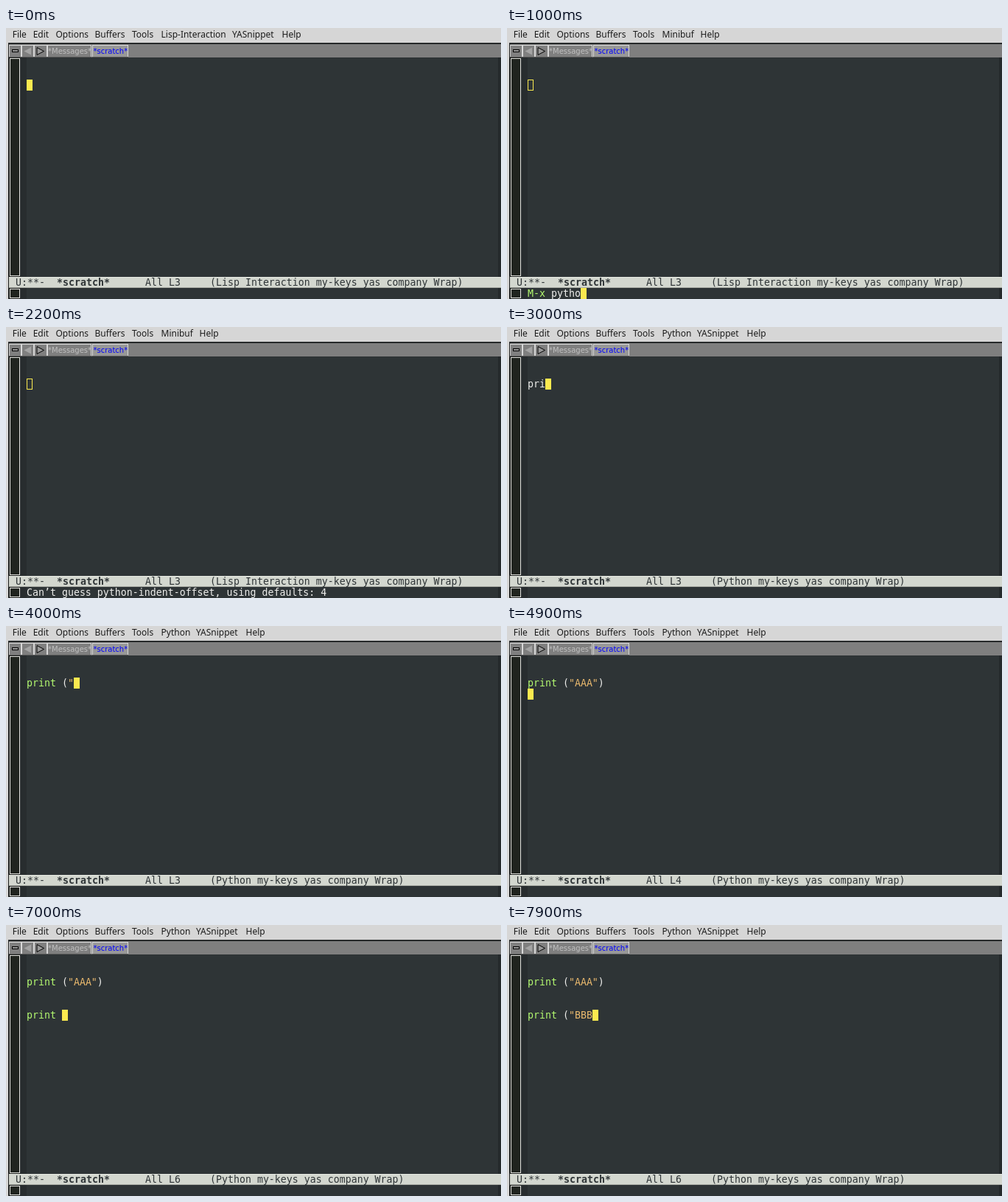
These frames come from a looping animation (672x368 px, 8000 ms). An HTML page:

```html
<!DOCTYPE html>
<html lang="en">
<head>
<meta charset="utf-8">
<title>Scratch buffer</title>
<style>
  html, body { margin: 0; width: 100%; height: 100%; overflow: hidden; background: #2e3436; }
  svg { display: block; width: 672px; height: 368px; }
  text { white-space: pre; }
  .menu { font: 12px "Noto Sans", "Open Sans", sans-serif; fill: #1c1c1c; }
  .tab { font: 10px "DejaVu Sans", sans-serif; fill: #c0c0c0; }
  .mono { font: 13.289px "DejaVu Sans Mono", monospace; fill: #eeeeec; }
  .mode { fill: #2e3436; }
  .bold { font-weight: bold; }
  .key { fill: #b4fa70; }
  .str { fill: #e9b96e; }
  .crisp { shape-rendering: crispEdges; }
</style>
</head>
<body>
<svg viewBox="0 0 672 368">
  <g class="crisp">
    <rect width="672" height="368" fill="#2e3436"/>
    <!-- fringes -->
    <rect x="19" y="40" width="9" height="298" fill="#282d2f"/>
    <rect x="668" y="40" width="4" height="298" fill="#24292b"/>
    <rect x="19" y="353" width="9" height="15" fill="#282d2f"/>
    <rect x="668" y="353" width="4" height="15" fill="#24292b"/>
    <!-- menu bar and window edge -->
    <rect width="672" height="20" fill="#d6d6d6"/>
    <rect y="20" width="672" height="2" fill="#26292a"/>
    <rect y="20" width="3" height="348" fill="#d6d6d6"/>
    <rect x="3" y="22" width="1" height="346" fill="#1a1c1c"/>
    <!-- tab bar -->
    <rect x="4" y="22" width="668" height="18" fill="#7f7f7f"/>
    <rect x="118" y="24" width="47" height="15" fill="#989898"/>
    <g id="boxes" fill="none"></g>
    <rect x="8.5" y="29.5" width="8" height="3" fill="#999" stroke="#000"/>
    <!-- scroll bars -->
    <rect x="4" y="40" width="15" height="298" fill="#191c1a"/>
    <rect x="5.5" y="41.5" width="13" height="295" fill="#20241f" stroke="#e4e4e0"/>
    <rect x="4" y="353" width="15" height="15" fill="#191c1a"/>
    <rect x="5.5" y="354.5" width="13" height="12" fill="#20241f" stroke="#e4e4e0"/>
    <!-- mode line -->
    <rect x="4" y="338" width="668" height="15" fill="#d3d7cf"/>
    <rect x="4" y="338" width="668" height="1" fill="#e6e9e2"/>
    <rect x="4" y="352" width="668" height="1" fill="#a9aca5"/>
  </g>
  <path d="M34 26.5V36.5L24.5 31.5Z" fill="#a4a4a4"/>
  <path d="M42 26.5V36.5L51.5 31.5Z" fill="#999" stroke="#000"/>
  <text class="tab" x="57" y="35">*Messages*</text>
  <text class="tab" x="118.5" y="35" style="fill:#00f">*scratch*</text>
  <g id="menu" class="menu"></g>
  <text class="mono mode" x="13" y="350">U:**-</text>
  <text class="mono mode bold" x="69" y="350">*scratch*</text>
  <text class="mono mode" x="189" y="350" id="line"></text>
  <text class="mono mode" x="277" y="350" id="modes"></text>
  <text class="mono" x="28" y="82" id="row1"></text>
  <text class="mono" x="28" y="127" id="row2"></text>
  <text class="mono" x="28" y="365" id="echo"></text>
  <rect id="hollow" class="crisp" x="28.5" y="70.5" width="7" height="14" fill="none" stroke="#fce94f"/>
  <rect id="cursor" class="crisp" width="8" height="15" fill="#fce94f"/>
</svg>
<script>
const LOOP = 8000, CELL = 8, LEFT = 28;
const el = id => document.getElementById(id);
const span = (cls, s) => `<tspan class="${cls}">${s}</tspan>`;

// raised boxes around the tab bar buttons: left, right
el("boxes").innerHTML = [[5, 20], [22, 37], [39, 55], [57, 115], [118, 165]].map(([a, b]) =>
  `<path stroke="#d8d8d8" d="M${a - .5} 39V23.5H${b + .5}V39"/>` +
  `<path stroke="#5c5c5c" d="M${a - 1} 39.5H${b + 1}"/>`).join("");

const FIXED = [[8.7, "File"], [36.7, "Edit"], [67.5, "Options"], [120.5, "Buffers"], [171, "Tools"]];
const MENUS = {
  lisp: [[210.5, "Lisp-Interaction"], [307, "YASnippet"], [374.5, "Help"]],
  mini: [[210.5, "Minibuf"], [262.5, "Help"]],
  python: [[210.5, "Python"], [258, "YASnippet"], [325.5, "Help"]]
};

// part of s typed by time t
const typed = (s, t, start, step) =>
  t < start ? "" : s.slice(0, Math.floor((t - start) / step) + 1);

const highlight = s => s
  .replace(/"[^"]*"?/, m => `\u0001${m}\u0002`)
  .replace(/^print/, m => span("key", m))
  .replace(/\u0001(.*)\u0002/, (_, m) => span("str", m));

const shown = {};
function put(id, html) {
  if (shown[id] === html) return;
  shown[id] = html;
  el(id).innerHTML = html;
}

function draw(t) {
  const prompt = t >= 200 && t < 2300;
  const asking = t >= 200 && t < 2100;
  const python = t >= 2300;
  const menu = prompt ? "mini" : python ? "python" : "lisp";
  const name = typed("python-mode", t, 350, 155);
  const one = typed("print (\"", t, 2600, 180) + typed("AAA\")", t, 4080, 130);
  const two = typed("print ", t, 5970, 165) + typed("(\"BBB", t, 7100, 195);
  const line = 3 + [4900, 5200, 5550].filter(at => t >= at).length;

  put("menu", FIXED.concat(MENUS[menu])
    .map(([x, s]) => `<text x="${x}" y="13">${s}</text>`).join(""));
  put("line", "All L" + line);
  put("modes", `(${python ? "Python" : "Lisp Interaction"} my-keys yas company Wrap)`);
  put("row1", highlight(one));
  put("row2", highlight(two));
  put("echo", asking ? span("key", "M-x ") + name
    : t >= 2100 && t < 2600 ? "Can’t guess python-indent-offset, using defaults: 4" : "");

  const col = asking ? 4 + name.length : line === 3 ? one.length : two.length;
  const cursor = el("cursor");
  cursor.setAttribute("x", LEFT + col * CELL);
  cursor.setAttribute("y", asking ? 353 : 25 + line * 15);
  cursor.style.display = prompt && !asking ? "none" : "";
  el("hollow").style.display = prompt ? "" : "none";
}

function tick() {
  draw(performance.now() % LOOP);
  requestAnimationFrame(tick);
}
tick();
</script>
</body>
</html>
```
